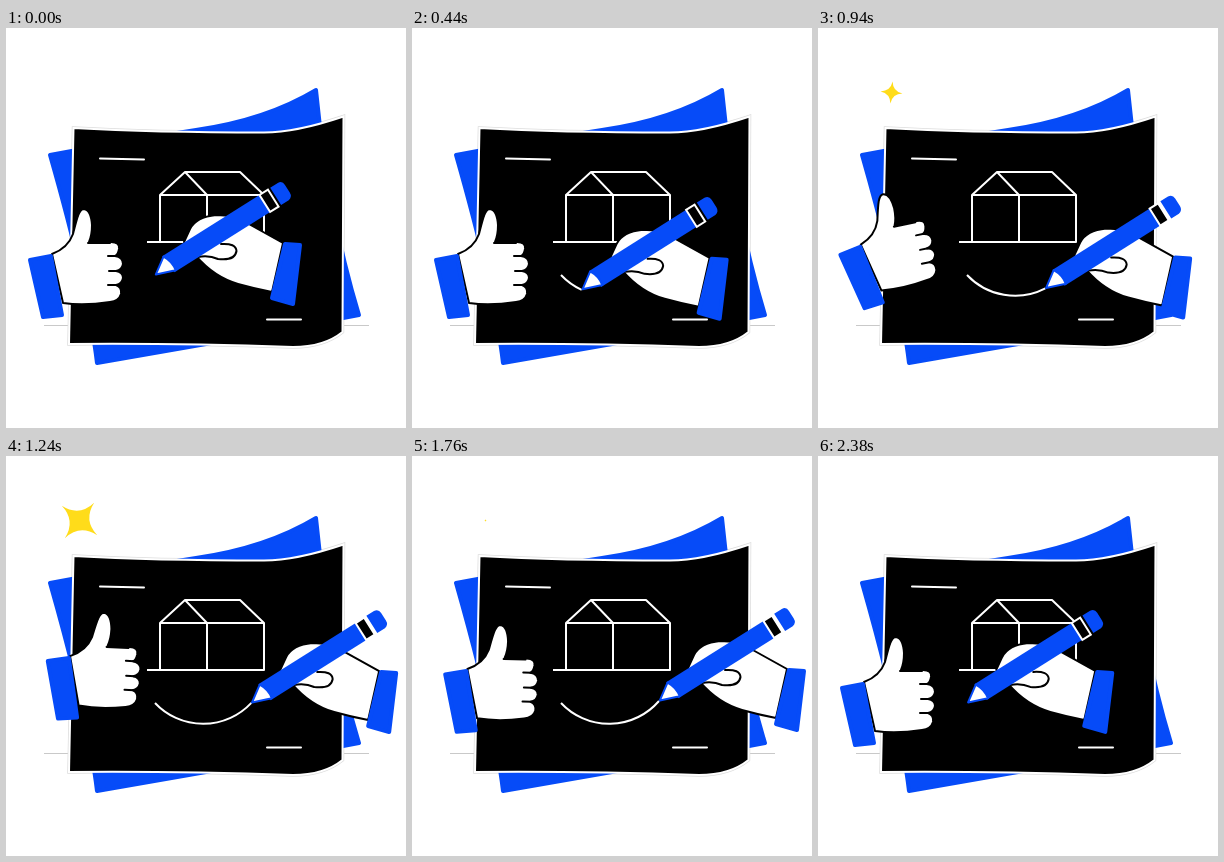
An HTML page that plays this animation: 400 by 400 pixels, repeating every 2400 ms.

```html
<!DOCTYPE html>
<html lang="en">
<head>
<meta charset="utf-8">
<style>
  html, body { margin: 0; width: 100%; height: 100%; overflow: hidden; background: #fff; }
  svg { display: block; width: 100vw; height: 100vh; }
  .blue { fill: #064bf8; stroke: #064bf8; stroke-width: 4; stroke-linejoin: round; }
  .chalk { fill: none; stroke: #fff; stroke-width: 2; stroke-linejoin: round; }
  .hand { fill: #fff; stroke: #000; stroke-width: 2; stroke-linejoin: round; stroke-linecap: round; }
  .crease { fill: none; stroke: #000; stroke-width: 2; stroke-linecap: round; }
</style>
</head>
<body>
<svg viewBox="0 0 400 400">
  <defs>
    <path id="sheet" d="M67.500 100 C130 103.500 200 104.500 258 104.500 Q290 104.500 337.500 88.500 L336.500 304 Q318 319 287 319 Q170 315 63 316 Z"/>
  </defs>

  <path d="M38 297.500H363" stroke="#bbb" stroke-width=".8"/>
  <use href="#sheet" fill="none" stroke="#ddd" stroke-width="3.500"/>
  <path class="blue" d="M44 127 Q118 113 190 102 Q260 92 310 62 Q322 185 353 287 Q270 303 200 316 L91 335 Q82 260 44 127 Z"/>
  <use href="#sheet" stroke="#fff" stroke-width="2"/>

  <g class="chalk">
    <path stroke-linecap="round" d="M94 130.500 L138 131.500 M261 291.500 H295"/>
    <path d="M141 214 H258 V167 L234 144 H179 L154 167 H258 M179 144 L201 167 V214 M154 167 V214"/>
    <path id="arc" d="M149 247 A66 66 0 0 0 247 245"/>
  </g>

  <path id="star" fill="#ffdc1a" d="M0 -23 Q2.500 -2.500 23 0 Q2.500 2.500 0 23 Q-2.500 2.500 -23 0 Q-2.500 -2.500 0 -23Z"/>

  <g id="thumb">
    <path class="hand" d="M46 226 Q62 220 67 206 C71 190 73 181 78 181 Q85 182 86 197 Q86 207 83 214 H105 Q114 214 113 221 Q112 227 109 228 Q117 229 117 236 Q116 242 110 243 Q117 244 117 250 Q116 256 110 257 Q116 259 115 266 Q113 273 104 274 Q78 278 57 275 Z"/>
    <path class="crease" d="M82 215 H104 M102 228 H110 M103 243 H111 M102 257 H111"/>
    <path class="blue" d="M24 232 L45 228 L56 287 L37 289 Z"/>
  </g>

  <g id="writer">
    <path class="hand" d="M277 215 L241 195 Q228 187 210 187 Q190 189 184 201 L178 214 L190 228 Q208 249 232 256 Q250 261 266 264 Z"/>
    <path class="crease" d="M192 229 Q203 227 212 231 Q229 233 230.500 223 Q230 215 215 216"/>
    <g transform="translate(149 247) rotate(-32.200)">
      <path fill="#064bf8" d="M16 -12 H132 V8 H18 Z"/>
      <path fill="#fff" stroke="#064bf8" stroke-width="2" stroke-linejoin="round" d="M1 0 L17 -11 Q22 -2 20 7 Z"/>
      <path stroke="#fff" stroke-width="2" d="M131 -12 H141 V8 H131 Z"/>
      <path fill="#064bf8" d="M144 -12.500 H153 Q158 -12 158 -7 V2 Q158 7 153 8 H144 Z"/>
    </g>
    <path class="blue" d="M279 216 L294 217 L287 276 L266 270 Z"/>
  </g>
</svg>
<script>
const LOOP = 2400;
const [arc, star, thumb, writer] =
  ['arc', 'star', 'thumb', 'writer'].map(id => document.getElementById(id));
const arcLength = arc.getTotalLength();

const ramp = (t, from, to) => Math.min(1, Math.max(0, (t - from) / (to - from)));
const ease = (t, from, to) => (1 - Math.cos(Math.PI * ramp(t, from, to))) / 2;

function moveWriter(t) {
  const drawn = ease(t, 0, 1380);
  const back = ease(t, 1790, LOOP);
  const tip = arc.getPointAtLength(arcLength * drawn);
  const x = tip.x - 149 - 98 * back;
  const y = tip.y - 247 + 2 * back - 26 * back * (1 - back);
  writer.setAttribute('transform', `translate(${x} ${y})`);

  // The stroke is trimmed from its start while it fades.
  arc.style.strokeDasharray = `0 ${arcLength * back} ${arcLength * (drawn - back)} 999`;
  arc.style.opacity = drawn > 0 ? 1 - back : 0;
}

function moveThumb(t) {
  const rest = 1 - ease(t, 1400, 2120);
  const x = (-3 * ease(t, 460, 860) + 21 * ease(t, 860, 1290)) * rest;
  const y = -24 * ease(t, 460, 1200) * rest;
  const turn = (-12 * ease(t, 460, 900) + 15 * ease(t, 900, 1270)) * rest;
  thumb.setAttribute('transform', `translate(${x} ${y}) rotate(${turn} 85 240)`);
}

function moveStar(t) {
  const size = ramp(t, 860, 1030) - ramp(t, 1597, 1770);
  const turn = 0.113 * (t - 890);
  star.setAttribute('transform', `translate(73.500 64.500) rotate(${turn}) scale(${size})`);
}

function draw(now) {
  const t = now % LOOP;
  moveWriter(t);
  moveThumb(t);
  moveStar(t);
  requestAnimationFrame(draw);
}
draw(performance.now());
</script>
</body>
</html>
```
